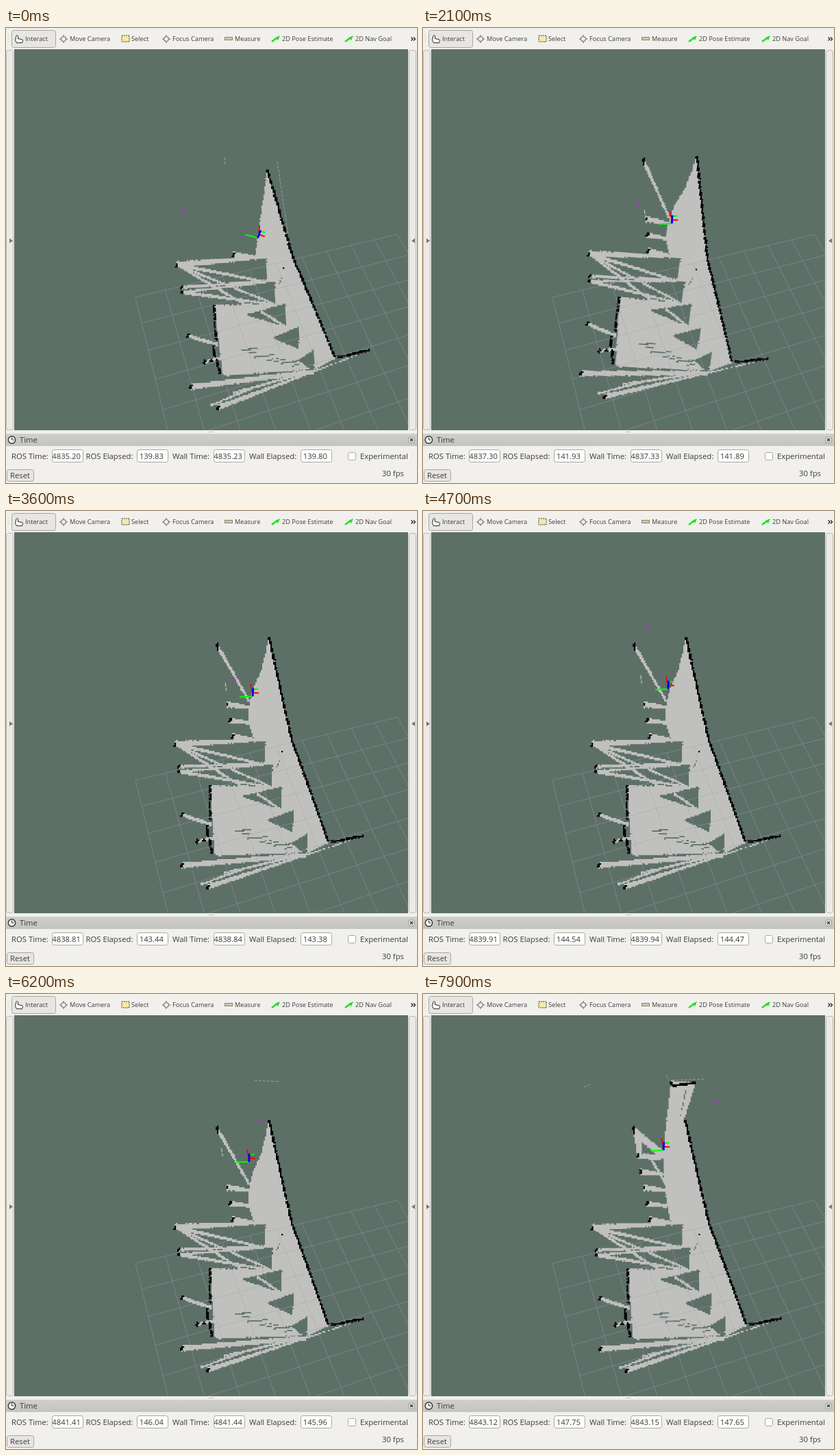
An HTML page with a canvas for the animation above (8000 ms loop, 600 px wide and 664 px high).

```html
<!DOCTYPE html>
<html lang="en">
<head>
<meta charset="utf-8">
<title>Laser mapping view</title>
<style>
html, body { margin: 0; width: 100%; height: 100%; overflow: hidden; background: #f1f0ec; }
canvas, svg { position: absolute; left: 0; top: 0; }
canvas { left: 12px; top: 31px; }
text { font: 11.3px "Open Sans", "Noto Sans", sans-serif; fill: #3c3c3c; }
.tool text { font-size: 9.2px; }
.frame { fill: #fff; stroke: #aaa7a1; }
.button { fill: #e8e6e2; stroke: #a9a6a0; }
</style>
</head>
<body>
<canvas id="view" width="575" height="556"></canvas>
<svg width="600" height="664">
  <defs>
    <linearGradient id="head" x2="0" y2="1"><stop stop-color="#cfcfcc"/><stop offset="1" stop-color="#c3c3c0"/></linearGradient>
    <g id="pose"><path d="M0 9L8 3" stroke="#20e020" stroke-width="2.4"/><path d="M12 0L5 3L9 7z" fill="#20e020"/></g>
    <g id="cross" fill="none" stroke="#88867f" stroke-width="1.4"><path d="M6 0V12M0 6H12"/><circle cx="6" cy="6" r="3.4" fill="#f1f0ec"/></g>
  </defs>
  <g class="tool">
    <path d="M3.5 10v12" stroke="#c9c6c0" stroke-dasharray="1 2"/>
    <rect class="button" x="8.5" y="3.5" width="64" height="25" rx="3"/>
    <path d="M15 11.500q1.500-2 2.500 0v4l6 1.200q1.500 .5 1 2l-1 3h-8l-2-4z" fill="#fff" stroke="#222"/>
    <text x="28" y="19">Interact</text>
    <use href="#cross" x="78" y="10"/><text x="93" y="19">Move Camera</text>
    <rect x="169" y="11" width="11" height="9" fill="#f7e9a8" stroke="#444" stroke-dasharray="2 1"/>
    <text x="183" y="19">Select</text>
    <use href="#cross" x="228" y="10"/><text x="243" y="19">Focus Camera</text>
    <rect x="319.5" y="13.5" width="11" height="4" fill="#d6c6a4" stroke="#8d8270"/><text x="334" y="19">Measure</text>
    <use href="#pose" x="388" y="11"/><text x="403" y="19">2D Pose Estimate</text>
    <use href="#pose" x="495" y="11"/><text x="510" y="19">2D Nav Goal</text>
    <path d="M591.500 13.500l2.500 2.500-2.500 2.500M595 13.500l2.500 2.500-2.500 2.500" fill="none" stroke="#222" stroke-width="1.3"/>
  </g>
  <g fill="#eceae6" stroke="#bab7b1">
    <rect x=".5" y="32.5" width="10" height="554" rx="3"/>
    <rect x="588.5" y="32.5" width="10" height="554" rx="3"/>
  </g>
  <path d="M5 307l5 3.500-5 3.500zM597 307l-5 3.500 5 3.500z" fill="#77756f"/>
  <path d="M296 589.500h7" stroke="#99968f" stroke-dasharray="1 1"/>
  <rect y="592" width="600" height="18" fill="url(#head)"/>
  <circle cx="8.5" cy="601" r="5.2" fill="#f4f4f2" stroke="#333" stroke-width="1.4"/>
  <path d="M8.500 597.500V601h3" fill="none" stroke="#333"/>
  <text x="20" y="605">Time</text>
  <rect x="588" y="597" width="8" height="8" rx="1" fill="#f3f3f1" stroke="#99968f"/>
  <path d="M590 599l4 4m0-4l-4 4" stroke="#333" stroke-width="1.5"/>
  <text x="8" y="629">ROS Time:</text>
  <text x="116.5" y="629">ROS Elapsed:</text>
  <text x="243" y="629">Wall Time:</text>
  <text x="355" y="629">Wall Elapsed:</text>
  <g id="fields"></g>
  <rect class="frame" x="499.5" y="619.5" width="11" height="11" rx="2"/>
  <text x="517" y="629">Experimental</text>
  <rect class="button" x="1.5" y="644.5" width="39" height="17" rx="3"/>
  <text x="6" y="657">Reset</text>
  <text x="549" y="654">30 fps</text>
</svg>
<script>
const LOOP = 8, STEP = .1, CELL = 2;
const TURN = .4, GROW = 1.5, TURN_BACK = 3.2, FINISH = 6.8;
const ctx = document.getElementById('view').getContext('2d');

// Clock fields: left edge, start value, rate
const clocks = [[67, 4835.20, 1.002], [191, 139.83, 1.002], [303, 4835.23, 1.002], [430, 139.80, .994]];
document.getElementById('fields').innerHTML = clocks.map(([x], i) =>
  `<clipPath id="c${i}"><rect x="${x + 1}" y="616" width="44" height="18"/></clipPath>
   <rect class="frame" x="${x + .5}" y="615.5" width="45" height="18" rx="3"/>
   <g clip-path="url(#c${i})"><text x="${x + (i % 2 ? 39 : 42)}" y="629" text-anchor="end"></text></g>`).join('');
const readouts = document.querySelectorAll('#fields text');

function random(seed) {
  return () => (seed = (seed * 16807) % 2147483647) / 2147483647;
}

// Strip from a to b, with its height at either end
function ray([x1, y1], [x2, y2], h1 = 4, h2 = h1) {
  return `M${x1},${y1 - h1 / 2}L${x2},${y2 - h2 / 2} ${x2},${y2 + h2 / 2} ${x1},${y1 + h1 / 2}z`;
}

// Gaps left between successive scans, stepping down along the wall
const tooth = i => {
  const x = 379 + 9 * i + 1.6 * i * i, y = 334 + 34 * i;
  return { top: [x, y], low: [x - 2, y + 36 - i], tip: [268 + 37 * i, 347 + 34.5 * i] };
};
const teeth = Array.from({ length: 5 }, (_, i) => tooth(i));
const spurPost = j => [331 - 4.2 * j, 329 - 23.3 * j];

function buildMap(version) {
  const rand = random(7), free = [], solid = [];
  const add = d => free.push([true, new Path2D(d)]);
  const cut = d => free.push([false, new Path2D(d)]);
  const post = ([x, y]) => solid.push(`M${x - 1},${y + 3}l2,-6`);
  const apex = version ? '384,184' : '388,208';
  const side = ['', 'Q343,286 372,236', 'Q350,280 352,225L364,127 400,130 381,187'][version];
  add(`M${apex}L416,330 471,484 442,498 305,503 298,402 386,404 377,368 362,334${side}z`);
  teeth.forEach(({ top, low, tip }) => cut(`M${top}L${low} ${tip}z`));

  // Rays from the far left posts to the tooth corners
  const [a, b, c] = [[247, 340], [252, 373], [252, 380]];
  const [first, second, third, , last] = teeth;
  add(ray(a, first.top, 9, 3));
  add(ray(a, first.low, 5, 3));
  add(ray(a, second.low, 4, 3));
  add(ray(a, [346, 403], 4));
  add(ray(b, second.top, 4, 3));
  add(ray(c, second.low, 5, 3));
  add(ray(c, first.low, 3));
  add(ray([298, 403], second.low, 5, 3));
  add(ray([366, 412], third.low, 4));

  // Lower openings
  const [d, e, f, g] = [[257, 443], [279, 482], [257, 517], [295, 549]];
  add(ray(d, [300, 458], 5));
  add(ray(e, [303, 477], 4));
  add(ray(f, last.low, 8, 6));
  add(ray([284, 545], [345, 523], 3));
  add(ray([318, 528], [440, 500], 3));
  add(`M294,545L440,500 522,474 295,552z`);
  for (let i = 0; i < 9; i++) {
    const x = 335 + 9 * i, y = 467 + 2.5 * i + 8 * rand();
    cut(ray([x, y], [x + 10 + 14 * rand(), y - 2], 2));
  }
  cut(ray([395, 375], [399, 366], 4));

  // Side openings appear in pairs as the map grows
  for (let j = 0; j <= 2 * version; j++) {
    const [x, y] = spurPost(j);
    add(ray([x, y], [x + 33, y + 4], 9, 3));
    post([x, y]);
  }
  if (version) {
    add(ray([309, 198], [355, 277], 9, 6));
    solid.push('M308,193l1,12');
  }
  if (version === 2) {
    add('M307,192L352,229 361,240 314,238z');
    cut('M319,214L341,234 320,233z');
    cut(ray([377, 178], [386, 138], 5));
    solid.push('M364,128v5M367,134L400,130');
  }
  [a, b, c, d, e, f, g].forEach(post);
  solid.push(`M${apex}L416,330 471,484M473,483L522,474M403,350v2`,
    'M297,400L299,416 297,430 299,452M293,458l1,17M297,478L298,490 302,501M286,481l5,-1');
  return rasterize(free.reverse(), new Path2D(solid.join('')), rand);
}

// Turn outlines into ragged occupancy cells
function rasterize(areas, wall, rand) {
  const probe = document.createElement('canvas').getContext('2d');
  const free = new Path2D(), solid = new Path2D();
  probe.lineWidth = 3.2;
  probe.setLineDash([11, 1]);
  for (let y = 120; y < 558; y += CELL)
    for (let x = 238; x < 528; x += CELL) {
      const px = x + CELL / 2 + rand() - .5, py = y + CELL / 2 + rand() - .5;
      const hit = areas.find(([, p]) => probe.isPointInPath(p, px, py));
      if (probe.isPointInStroke(wall, px, py)) solid.rect(x, y, CELL + .2, CELL + .2);
      else if (hit && hit[0]) free.rect(x, y, CELL + .3, CELL + .3);
    }
  return { free, solid };
}
const maps = [0, 1, 2].map(buildMap);

// Small turn of the ground plane as seen by the tilted camera
function turnGround(k) {
  ctx.transform(1 + .0112 * k, .0784 * k, -.1217 * k, 1 - .0183 * k, 34 * k, -23.8 * k);
}

function line(color, width, x1, y1, x2, y2, dash = []) {
  ctx.strokeStyle = color;
  ctx.lineWidth = width;
  ctx.setLineDash(dash);
  ctx.beginPath();
  ctx.moveTo(x1, y1);
  ctx.lineTo(x2, y2);
  ctx.stroke();
}

// Ten by ten cells in perspective
function drawGrid() {
  const point = (u, v) => {
    const w = 1 + .016 * u - .027 * v;
    return [(189 + 47.4 * u + 3.8 * v) / w, (393 - 4.38 * u + 26 * v) / w];
  };
  for (let i = 0; i <= 10; i++) {
    line('rgba(160,160,164,.42)', 1, ...point(i, 0), ...point(i, 10));
    line('rgba(160,160,164,.42)', 1, ...point(0, i), ...point(10, i));
  }
}

function drawScan(t, x, y) {
  const faint = (...p) => line('#93a29a', 1, ...p, [4, 2]);
  if (t < TURN) {
    faint(396, 195, 412, 302);
    faint(319.5, 189, 319.5, 201);
  } else if (t < FINISH) {
    line('#c6cbc6', 1.2, x - 39, y - 20, x - 37.5, y - 8, [6, 2]);
  }
  if (t >= TURN && t < GROW) faint(392, 193, 393, 212);
  if (t >= 5 && t < FINISH) faint(363, 126, 400, 128);
  if (t >= FINISH) {
    faint(235, 136, 246, 131);
    faint(355, 119, 359, 125);
    faint(364, 126, 412, 124);
  }
}

function drawRobot(t, x, y) {
  ctx.save();
  ctx.translate(x, y);
  if (t < TURN) ctx.rotate(.3);
  line('#0f0', 2, -18, 1, 0, 0);
  line('#0f0', 2, 1, -10, 9, -11);
  line('#f00', 2, -2, -18, 0, -9);
  line('#f00', 2, 2, -5, 10, -5);
  line('#0000f0', 3, 1, 0, 1.5, -12);
  ctx.restore();
}

// Marker stops: time, x, y
const stops = [[0, 257, 267], [.8, 329, 287], [2.1, 314, 257], [3.6, 334, 247], [4.7, 325, 168], [6.2, 371, 184], [7.9, 427, 158]];
function drawMarker(t) {
  const i = Math.max(1, stops.findIndex(s => s[0] >= t));
  const [from, to] = [stops[i - 1], stops[i]];
  const k = (t - from[0]) / (to[0] - from[0]);
  const mix = n => from[n] + (to[n] - from[n]) * k;
  ctx.fillStyle = '#d020d8';
  ctx.fillRect(mix(1) - 1.5, mix(2) - 1.5, 3.5, 3);
}

function draw(t) {
  const map = maps[t < GROW ? 0 : t < FINISH ? 1 : 2];
  const yaw = t < TURN ? -.5 : t < TURN_BACK ? 1 : t < FINISH ? 0 : -.08;
  ctx.setTransform(1, 0, 0, 1, -12, -31);
  ctx.fillStyle = '#5d7068';
  ctx.fillRect(12, 31, 575, 556);
  ctx.save();
  turnGround(yaw);
  ctx.fillStyle = '#c0c0be';
  ctx.fill(map.free);
  ctx.fillStyle = '#050505';
  ctx.fill(map.solid);
  ctx.restore();
  drawGrid();
  const x = 366.7 - 2.1 * t, y = 306 - 9.86 * t;
  drawScan(t, x, y);
  drawRobot(t, x, y);
  drawMarker(t);
  clocks.forEach(([, start, rate], i) => readouts[i].textContent = (start + rate * t).toFixed(2));
}

const begin = performance.now();
let shown = -1;
function tick() {
  const step = Math.floor(((performance.now() - begin) / 1000 % LOOP) / STEP);
  if (step !== shown) draw((shown = step) / 10);
  requestAnimationFrame(tick);
}
tick();
</script>
</body>
</html>
```
